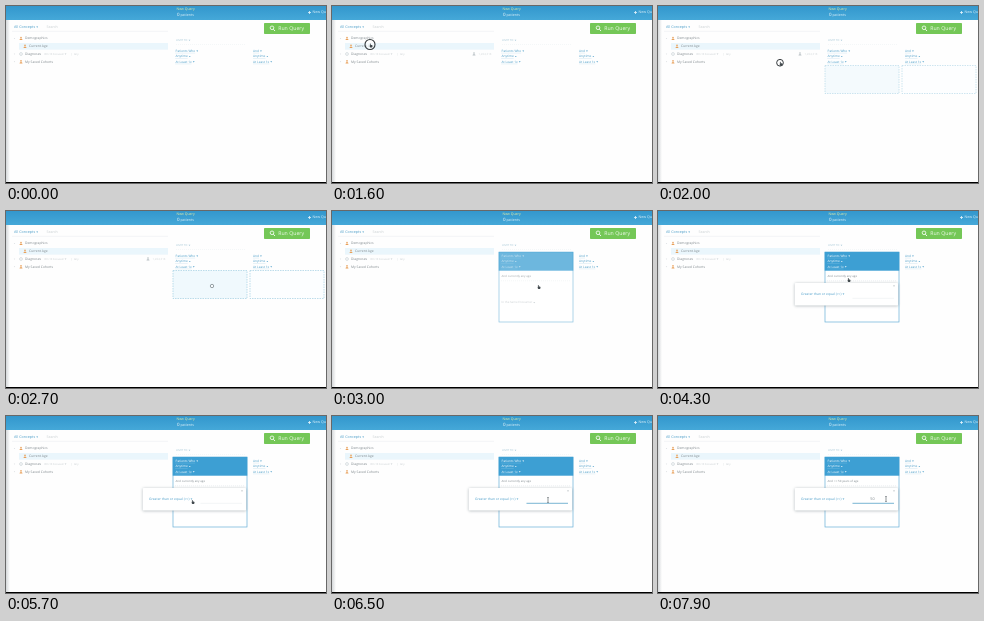
These frames come from a looping animation (320 by 177 pixels, 8000 ms). An HTML page with a canvas:

```html
<!DOCTYPE html>
<html lang="en">
<head>
<meta charset="utf-8">
<title>Query builder</title>
<style>
html, body { margin: 0; width: 100%; height: 100%; overflow: hidden; background: #fff; }
canvas { display: block; width: 100vw; height: 100vh; }
</style>
</head>
<body>
<canvas id="stage"></canvas>
<script>
const W = 320, H = 177, LOOP = 8000, STEP = 100;
const canvas = document.getElementById('stage');
const c = canvas.getContext('2d');
const BLUE = '#4a9dc8', GREY = '#7d868b', PALE = '#c6cccf', ORANGE = '#e8a05a';

const clamp = v => Math.max(0, Math.min(1, v));
const ramp = (t, a, b) => clamp((t - a) / (b - a));
const ease = v => v * v * (3 - 2 * v);
const mix = (a, b, k) => a + (b - a) * k;

// Pointer stops: time, x, y; it glides between neighbours
const stops = [
  [300, 74, 140], [800, 38, 47], [1000, 38, 47], [1200, 38, 38.5],
  [1700, 38, 38.5], [2300, 206, 75], [3200, 206, 75], [3600, 190, 68],
  [4300, 190, 68], [4700, 186, 85], [5700, 186, 85], [6400, 216, 84],
  [7500, 216, 84], [7900, 228, 83]
];

function pointer(t) {
  let i = 0;
  while (i < stops.length - 2 && t > stops[i + 1][0]) i++;
  const [t0, x0, y0] = stops[i], [t1, x1, y1] = stops[i + 1];
  const k = ease(ramp(t, t0, t1));
  return [mix(x0, x1, k), mix(y0, y1, k)];
}

function rect(x, y, w, h, fill) {
  c.fillStyle = fill;
  c.fillRect(x, y, w, h);
}

function line(x0, y0, x1, y1, color, width = 0.5, dash = []) {
  c.strokeStyle = color;
  c.lineWidth = width;
  c.setLineDash(dash);
  c.beginPath();
  c.moveTo(x0, y0);
  c.lineTo(x1, y1);
  c.stroke();
  c.setLineDash([]);
}

function circle(x, y, r) {
  c.beginPath();
  c.arc(x, y, r, 0, 7);
}

// Set large and scaled down so tiny glyphs keep exact widths
function text(str, x, y, size, color) {
  c.save();
  c.translate(x, y);
  c.scale(0.1, 0.1);
  c.font = `${size * 10}px "Open Sans", sans-serif`;
  c.textBaseline = 'middle';
  c.fillStyle = color;
  c.fillText(str, 0, 0);
  const w = c.measureText(str).width / 10;
  c.restore();
  return w;
}

function arrow(x, y, color, s = 0.9) {
  c.fillStyle = color;
  c.beginPath();
  c.moveTo(x - s, y - s / 2);
  c.lineTo(x + s, y - s / 2);
  c.lineTo(x, y + s * 0.7);
  c.fill();
}

function menu(str, x, y, size, color) {
  const w = text(str, x, y, size, color);
  arrow(x + w + 2, y, color);
  return w;
}

function fade(alpha, draw) {
  if (alpha <= 0) return;
  c.save();
  c.globalAlpha *= alpha;
  draw();
  c.restore();
}

function person(x, y, color = ORANGE) {
  c.fillStyle = color;
  circle(x, y - 0.9, 0.8);
  c.fill();
  c.beginPath();
  c.arc(x, y + 1.6, 1.5, Math.PI, 0);
  c.fill();
}

function header() {
  const g = c.createLinearGradient(0, 0, 0, 14);
  g.addColorStop(0, '#3397cd');
  g.addColorStop(1, '#45a8d8');
  rect(0, 0, W, 14, g);
  text('New Query', 170.5, 3.3, 3.5, '#eef0a0');
  text('0', 171, 9.2, 4.5, '#fff');
  text('patients', 174.4, 9.4, 3.6, '#e4f3fa');
  line(302, 6.5, 305, 6.5, '#e4f3fa', 0.8);
  line(303.5, 5, 303.5, 8, '#e4f3fa', 0.8);
  text('New Query', 306.5, 6.5, 3.6, '#e4f3fa');
}

function button() {
  c.fillStyle = '#74c757';
  c.beginPath();
  c.roundRect(258, 17, 46, 11, 0.8);
  c.fill();
  c.strokeStyle = '#fff';
  c.lineWidth = 0.8;
  circle(266, 21.8, 1.8);
  c.stroke();
  line(267.3, 23.2, 269, 25, '#fff', 0.9);
  text('Run Query', 272.2, 22.7, 5.2, '#f4fbf1');
}

function tree(t) {
  menu('All Concepts', 8, 21, 3.7, BLUE);
  text('Search', 40.5, 21, 3.6, PALE);
  line(6, 25.3, 162, 25.3, '#e4e9ec');
  rect(13, 37, 149, 6.6, '#eaf6fc');
  arrow(8.5, 32.5, PALE, 0.7);
  arrow(8.5, 48, PALE, 0.7);
  arrow(8.5, 55.8, PALE, 0.7);
  person(15, 32.5);
  person(19, 40.3);
  person(15, 55.8);
  c.strokeStyle = '#b3bfc5';
  c.lineWidth = 0.5;
  circle(15, 48, 1.4);
  c.stroke();
  text('Demographics', 19, 32.5, 3.35, GREY);
  text('Current Age', 23, 40.3, 3.35, GREY);
  text('Diagnoses', 19, 48, 3.35, GREY);
  menu('ICD-10 Focused', 38, 48, 2.7, PALE);
  text('|  Any', 65, 48, 2.7, PALE);
  text('My Saved Cohorts', 19, 55.8, 3.35, GREY);
  fade(ramp(t, 900, 1200) * (1 - ramp(t, 2700, 3000)), () => {
    person(142, 48, '#b9c1c5');
    text('1,204,318', 146.5, 48, 2.9, '#d3d8da');
  });
}

function criteria(first, x, color) {
  [first, 'Anytime', 'At Least 1x'].forEach((s, i) => {
    const y = 45 + i * 5.4;
    const w = menu(s, x, y, 3.2, color);
    fade(0.5, () => line(x, y + 2.1, x + w, y + 2.1, color, 0.4, [0.6, 0.4]));
  });
}

function dropZones(alpha) {
  fade(alpha, () => {
    for (const x of [167, 244]) {
      rect(x, 59.5, 74, 28, x < 200 ? '#f0f9fd' : '#fcfeff');
      c.strokeStyle = '#a3d0e2';
      c.lineWidth = 0.7;
      c.setLineDash([1.5, 1]);
      c.strokeRect(x, 59.5, 74, 28);
      c.setLineDash([]);
    }
  });
}

const typed = t => t < 6800 ? '' : t < 6900 ? '5' : '50';

function panel(t) {
  fade(ramp(t, 2700, 3100), () => {
    rect(167, 41, 74, 70, '#fff');
    c.strokeStyle = '#67b0d7';
    c.lineWidth = 0.7;
    c.strokeRect(167, 41, 74, 70);
    rect(166.7, 41, 74.6, 18.7, '#3d9fd3');
    criteria('Patients Who', 169.5, '#fff');
    const digits = typed(t);
    text('And', 169.5, 64.8, 2.9, GREY);
    const mark = ramp(t, 3200, 3500) * (1 - ramp(t, 3800, 4100));
    if (digits) text(`>= ${digits} years of age`, 176, 64.8, 2.9, GREY);
    else {
      text('currently any age', 175.8, 64.8, 2.9, GREY);
      fade(mark, () => {
        rect(175, 62.2, 26.5, 5.2, '#4ba3d0');
        text('currently any age', 175.8, 64.8, 2.9, '#fff');
      });
    }
    line(169, 69.8, 239, 69.8, '#d5dfe4', 0.4, [1, 1]);
    menu('In the Same Encounter', 169.5, 91.5, 2.9, '#b5bdc1');
  });
}

function popup(t) {
  fade(ramp(t, 3800, 4300), () => {
    c.save();
    c.shadowColor = 'rgba(50,70,80,.4)';
    c.shadowBlur = 3 * canvas.width / W;
    c.shadowOffsetY = 0.6 * canvas.height / H;
    c.fillStyle = '#fff';
    c.beginPath();
    c.roundRect(136.8, 72, 103.2, 22.5, 0.8);
    c.fill();
    c.restore();
    text('×', 235, 75.5, 3.6, '#8f999e');
    menu('Greater than or equal (>=)', 143, 83, 3.35, BLUE);
    line(194.5, 87.3, 236, 87.3, '#e5eaed', 0.5);
    fade(ramp(t, 6100, 6500), () => line(194.5, 87.3, 236, 87.3, BLUE, 0.7));
    text(typed(t), 212.3, 83.4, 3.8, GREY);
    const blink = t >= 6900 && (t < 7100 || (t >= 7400 && t < 7600));
    if (blink) line(217.3, 81.6, 217.3, 85.5, '#777', 0.4);
  });
}

function hand(x, y) {
  c.fillStyle = '#41484c';
  c.beginPath();
  c.roundRect(x - 1, y, 2.6, 2.3, 0.7);
  c.fill();
  line(x - 0.4, y - 1.5, x - 0.4, y + 0.4, '#41484c', 0.8);
}

function beam(x, y) {
  const ink = '#454d52';
  line(x, y - 2.4, x, y + 2.4, ink, 0.6);
  line(x - 0.9, y - 2.5, x + 0.9, y - 2.5, ink, 0.5);
  line(x - 0.9, y + 2.5, x + 0.9, y + 2.5, ink, 0.5);
}

function ring(x, y, t) {
  const k = ramp(t, 1700, 2300);
  c.fillStyle = 'rgba(255,255,255,.55)';
  c.strokeStyle = k < 1 ? '#34393c' : '#8d979b';
  c.lineWidth = mix(1.1, 0.9, k);
  circle(x, y, t < 1600 ? 6.5 : mix(5, 1.7, k));
  c.fill();
  c.stroke();
}

function drawPointer(t) {
  if (t < 300) return;
  const [x, y] = pointer(t);
  const dragging = t >= 1500 && t < 3000;
  if (dragging) ring(x, y, t);
  if (t >= 6200) beam(x, y);
  else if (!dragging || t < 2300) hand(x + 0.8, y + 0.6);
}

function draw(t) {
  c.setTransform(canvas.width / W, 0, 0, canvas.height / H, 0, 0);
  c.textRendering = 'geometricPrecision';
  rect(0, 0, W, H, '#fefefe');
  const edge = c.createLinearGradient(0, 0, 4, 0);
  edge.addColorStop(0, '#d5d8da');
  edge.addColorStop(1, '#fefefe');
  rect(0, 13, 4, 163, edge);
  header();
  button();
  tree(t);
  menu('LIMIT TO', 170, 34.3, 2.8, '#a5c6d6');
  line(170, 38.5, 240, 38.5, '#e4ebee', 0.4, [1, 1]);
  criteria('Patients Who', 169.5, BLUE);
  criteria('And', 247, BLUE);
  dropZones(ramp(t, 1700, 2100) * (1 - ramp(t, 2700, 3000)));
  panel(t);
  popup(t);
  drawPointer(t);
  rect(0, 176, W, 1, '#000');
}

function resize() {
  const d = window.devicePixelRatio || 1;
  canvas.width = Math.round(innerWidth * d);
  canvas.height = Math.round(innerHeight * d);
}

const start = performance.now();
function tick() {
  const t = (performance.now() - start) % LOOP;
  draw(Math.floor(t / STEP) * STEP);
  requestAnimationFrame(tick);
}
addEventListener('resize', resize);
resize();
tick();
</script>
</body>
</html>
```
